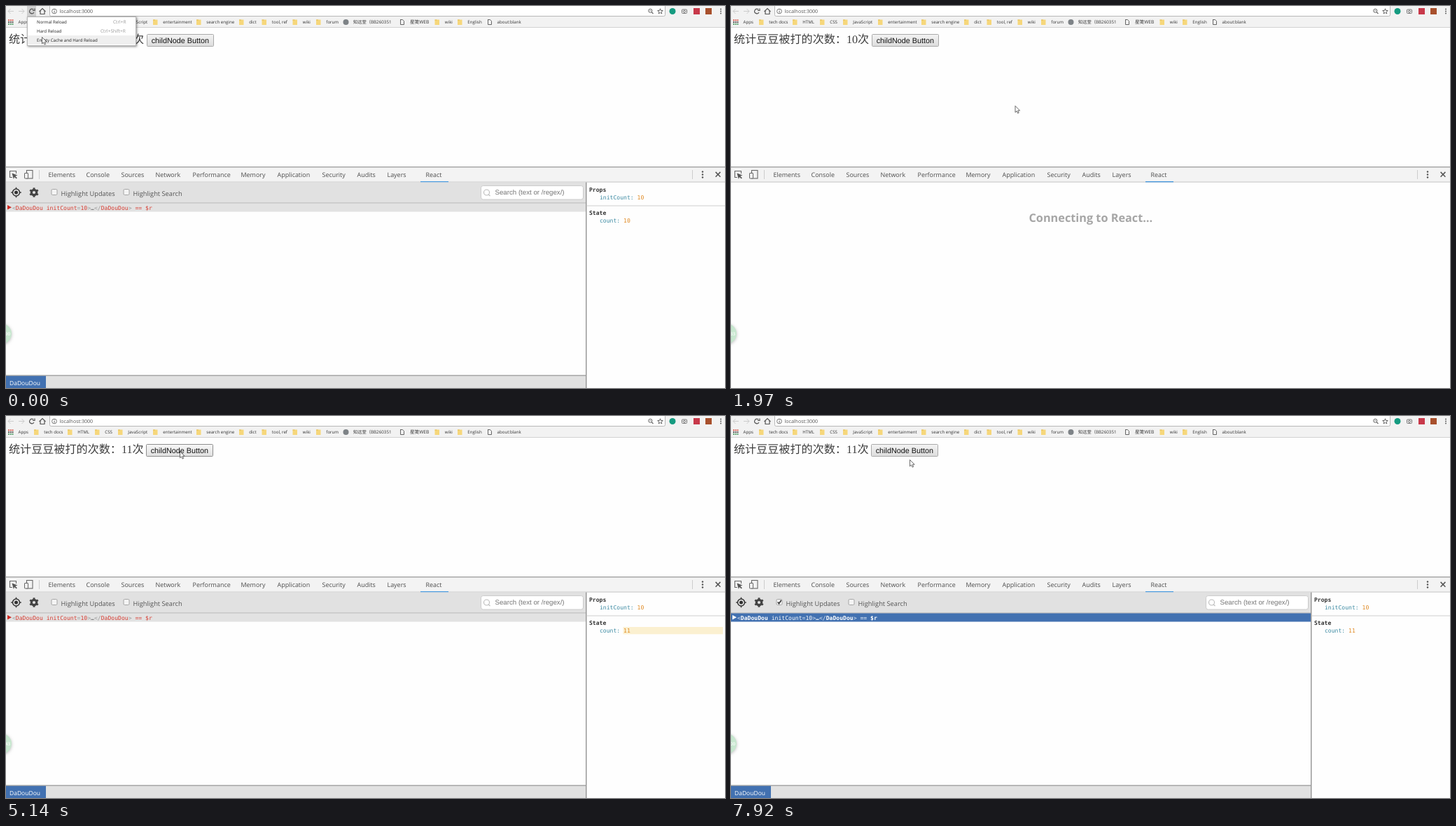
Animation of 1027x545 px, one loop 8 s. Source, as an HTML page with a canvas:

```html
<!DOCTYPE html>
<html lang="en">
<head>
<meta charset="utf-8">
<title>Counter demo</title>
<style>
html, body { margin: 0; width: 100%; height: 100%; overflow: hidden; background: #fefefe; }
canvas { display: block; }
</style>
</head>
<body>
<canvas id="stage" width="1027" height="545"></canvas>
<script>
const c = document.getElementById('stage').getContext('2d');
const LOOP = 8000;
const UI = '"Open Sans", "Noto Sans CJK SC", sans-serif';
const ARIAL = '"Liberation Sans", sans-serif';
const MONO = '"DejaVu Sans Mono", monospace';

// [time, x, y] of the pointer tip
const POINTER = [
  [0, 51, 44], [80, 51, 44], [90, 51, 47], [600, 51, 47], [790, 55, 59.5], [1100, 130, 92],
  [1500, 290, 128], [1970, 405.5, 142], [2700, 405, 142], [2970, 302, 165], [3350, 277, 102],
  [3640, 277, 102], [4000, 262, 66], [4400, 248, 50], [5640, 248, 50], [5900, 200, 130],
  [6300, 93, 265], [6500, 87, 267], [6900, 69, 264], [7180, 69, 264], [7500, 150, 190],
  [7850, 255, 75], [7920, 255, 62], [8000, 255, 62]
];
const BADGE = [[0, '90'], [500, '10'], [790, '11'], [1430, '22'], [1970, '33'], [2420, '43'],
  [3350, '40'], [3900, '43'], [5370, '41'], [6100, '42'], [7080, '00']];
const FOLDERS = [[40, 'tech docs'], [88, 'HTML'], [127, 'CSS'], [160, 'JavaScript'],
  [210, 'entertainment'], [272, 'search engine'], [333, 'dict'], [365.5, 'tool, ref'],
  [409.5, 'wiki'], [443, 'forum'], [612.5, 'wiki'], [645, 'English']];
const TABS = [[61, 'Elements'], [115, 'Console'], [165, 'Sources'], [214, 'Network'],
  [267, 'Performance'], [336, 'Memory'], [388, 'Application'], [452, 'Security'],
  [502, 'Audits'], [545, 'Layers'], [600, 'React']];

const rect = (x, y, w, h, color) => { c.fillStyle = color; c.fillRect(x, y, w, h); };

function text(s, x, y, size, color = '#333', family = UI, weight = 400) {
  c.font = `${weight} ${size}px ${family}`;
  c.fillStyle = color;
  c.fillText(s, x, y);
  return x + c.measureText(s).width;
}

function line(color, width, ...points) {
  c.strokeStyle = color;
  c.lineWidth = width;
  c.beginPath();
  points.forEach(([x, y]) => c.lineTo(x, y));
  c.stroke();
}

function disc(x, y, r, color) {
  c.fillStyle = color;
  c.beginPath();
  c.arc(x, y, r, 0, 7);
  c.fill();
}

function ring(x, y, r, color, width, from = 0, to = 2 * Math.PI) {
  c.strokeStyle = color;
  c.lineWidth = width;
  c.beginPath();
  c.arc(x, y, r, from, to);
  c.stroke();
}

function box(x, y, w, h, radius, fill, stroke) {
  c.beginPath();
  c.roundRect(x, y, w, h, radius);
  c.fillStyle = fill;
  c.fill();
  if (stroke) { c.strokeStyle = stroke; c.lineWidth = 1; c.stroke(); }
}

const cross = (x, y, r, color, width) => {
  line(color, width, [x - r, y - r], [x + r, y + r]);
  line(color, width, [x - r, y + r], [x + r, y - r]);
};
const dots = (x, y, gap, r, color) => [-gap, 0, gap].forEach(d => disc(x, y + d, r, color));
const between = (t, a, b) => t >= a && t < b;

function pointerAt(t) {
  const i = Math.max(1, POINTER.findIndex(k => k[0] > t));
  const [t0, x0, y0] = POINTER[i - 1], [t1, x1, y1] = POINTER[i];
  const p = (t - t0) / (t1 - t0);
  return [x0 + (x1 - x0) * p, y0 + (y1 - y0) * p];
}

function arrow(x, dir) {
  line('#ccc', 1, [x - 4, 7.5], [x + 4, 7.5]);
  line('#ccc', 1, [x + dir * .5, 4], [x + dir * 4, 7.5], [x + dir * .5, 11]);
}

function pageIcon(x) {
  line('#666', 1, [x, 19.5], [x + 3, 19.5], [x + 5, 21.5], [x + 5, 26.5], [x, 26.5], [x, 19]);
}

function browserBar(t) {
  rect(0, 0, 1027, 31, '#f2f2f2');
  rect(0, 30, 1027, 1, '#d2d2d2');
  arrow(7, -1);
  arrow(22, 1);
  if (t < 400) rect(30, 0, 13, 15, '#d0d0d0');
  if (between(t, 640, 1510)) cross(37, 7.5, 3, '#555', 1.2);
  else {
    ring(37, 7.5, 3.3, '#555', 1.2, .5, 5.5);
    line('#555', 1.2, [41, 3.5], [41, 6.5], [38, 6.5]);
  }
  line('#555', 1.2, [47.5, 8], [52, 3.5], [56.5, 8]);
  line('#555', 1.2, [49, 7], [49, 11.5], [55, 11.5], [55, 7]);

  box(62.5, -1.5, 879, 16, 2, '#fff', '#b8b8b8');
  ring(69, 7.5, 3.4, '#666', .9);
  rect(68.6, 7, 1, 2.6, '#666');
  rect(68.6, 5.3, 1, 1, '#666');
  text('localhost:3000', 76.5, 10, 7.05, '#555');
  ring(920.3, 6.8, 2.6, '#666', 1);
  line('#666', 1.2, [922.2, 8.8], [924.5, 11]);
  line('#666', .7, [919, 6.8], [921.6, 6.8]);
  line('#555', .9, ...Array.from({ length: 11 }, (_, i) => {
    const a = i * Math.PI / 5 - Math.PI / 2, r = i % 2 ? 1.7 : 4;
    return [934.5 + r * Math.cos(a), 7.8 + r * Math.sin(a)];
  }));

  disc(952, 7.5, 4.5, '#159b80');
  box(965.5, 5, 7, 5.5, 1, '#f2f2f2', '#777');
  ring(969, 7.8, 1.5, '#777', 1);
  rect(982, 3, 9, 9, '#c8394a');
  if (between(t, 640, 1300)) box(999.5, 3.5, 8, 8, 1, '#f2f2f2', '#d8d8d8');
  else rect(999, 3, 9, 9, '#a8502c');
  dots(1021, 7.5, 3, .9, '#555');

  for (let i = 0; i < 9; i++)
    rect(3 + i % 3 * 2.8, 19.3 + Math.floor(i / 3) * 2.8, 1.9, 1.9, ['#d9584c', '#555', '#4d9a62'][Math.floor(i / 3)]);
  text('Apps', 17.5, 25.3, 6.15);
  for (const [x, label] of FOLDERS) {
    rect(x, 19.5, 6.5, 7.5, '#f6d77b');
    rect(x, 19.5, 3, 1, '#e5bd55');
    text(label, x + 14.3, 25.3, 6.15);
  }
  disc(485.5, 23, 4, '#7d8286');
  text('知远堂（BB260351', 496, 25.3, 6.25);
  pageIcon(563.5);
  text('星笺WEB', 577, 25.3, 6.6);
  pageIcon(688.5);
  text('about:blank', 701.5, 25.3, 6.15);
}

function page(t) {
  const clicked = t >= 4450;
  const hover = between(t, 4200, 5720);
  text(`统计豆豆被打的次数：${clicked ? 11 : 10}次`, 4, 53, 16.1, '#3c3c3c',
    '"Liberation Serif", "Noto Sans CJK SC", serif', 300);
  const x = clicked ? 200.5 : 201.5;
  const shade = c.createLinearGradient(0, 40, 0, 58);
  shade.addColorStop(0, hover ? '#f8f8f8' : '#f4f4f4');
  shade.addColorStop(1, hover ? '#dfdfdf' : '#dcdcdc');
  box(x, 40.5, 95, 17, 1, shade, hover ? '#8e8e8e' : '#a9a9a9');
  text('childNode Button', x + 6.2, 52.8, 10.8, '#111', ARIAL);

  if (between(t, 640, 1200)) {
    box(-1, 217, 342, 13, [0, 3, 0, 0], '#e2e2e2');
    text('Connecting...', -.5, 226, 6, '#777');
  }
}

function menu() {
  c.save();
  c.shadowColor = 'rgba(0,0,0,.45)';
  c.shadowBlur = 3;
  c.shadowOffsetX = c.shadowOffsetY = 1;
  rect(30, 15, 156, 41.5, '#fff');
  c.restore();
  c.strokeStyle = '#b5b5b5';
  c.lineWidth = 1;
  c.strokeRect(30.5, 15.5, 155, 41);
  rect(31, 42, 154, 13, '#efefef');
  text('Normal Reload', 44, 25.3, 6.15, '#222');
  text('Hard Reload', 44, 38.2, 6.15, '#222');
  text('Empty Cache and Hard Reload', 44, 51, 6.15, '#222');
  text('Ctrl+R', 153, 25.3, 6.5, '#999');
  text('Ctrl+Shift+R', 135, 38.2, 6.5, '#999');
}

function devtoolsTabs() {
  rect(0, 229, 1027, 316, '#fefefe');
  rect(0, 229, 1027, 22, '#f3f3f3');
  rect(0, 229, 1027, 1.4, '#a2a2a2');
  rect(0, 250.6, 1027, 1, '#c4c4c4');
  line('#666', 1.1, [9, 244.5], [5.5, 244.5], [5.5, 235.5], [14.5, 235.5], [14.5, 239]);
  c.fillStyle = '#555';
  c.fill(new Path2D('M8.5 238.5l8 3-3.2 1.2 2.6 2.6-1.2 1.2-2.6-2.6-1.2 3z'));
  c.strokeStyle = '#666';
  c.lineWidth = 1.1;
  c.strokeRect(29.5, 234.5, 8.5, 11.5);
  box(26.5, 238.5, 5, 7.5, .5, '#f3f3f3', '#666');
  rect(47, 234, 1, 13, '#ccc');
  for (const [x, label] of TABS) text(label, x - .5, 244, 8.95, '#4c4c4c');
  rect(592, 250, 40, 1.4, '#4b9ce0');
  rect(980, 234, 1, 13, '#ccc');
  dots(995, 240.5, 4, 1.2, '#555');
  cross(1017, 240.3, 3.4, '#555', 1.5);
}

function checkbox(x, on) {
  box(x, 261.5, 8, 8, 1.5, '#f4f4f4', '#a5a5a5');
  if (on) line('#333', 1.6, [x + 1.8, 265.5], [x + 3.5, 267.6], [x + 6.8, 262.8]);
}

function toolbar(checked) {
  rect(0, 251.6, 828, 29, '#e1e1e1');
  ring(14.5, 266, 5, '#333', 1.5);
  disc(14.5, 266, 2.5, '#333');
  for (const [dx, dy] of [[1, 0], [-1, 0], [0, 1], [0, -1]])
    line('#333', 1.4, [14.5 + dx * 5, 266 + dy * 5], [14.5 + dx * 7.3, 266 + dy * 7.3]);
  ring(40, 266, 3.7, '#444', 3.2);
  for (let i = 0; i < 6; i++) {
    const a = i * Math.PI / 3 + Math.PI / 6;
    line('#444', 2.8, [40 + 4 * Math.cos(a), 266 + 4 * Math.sin(a)], [40 + 6.7 * Math.cos(a), 266 + 6.7 * Math.sin(a)]);
  }
  checkbox(65, checked);
  checkbox(168, false);
  text('Highlight Updates', 78.5, 270.7, 9.25, '#555');
  text('Highlight Search', 181.5, 270.7, 9.25, '#555');
  box(678.5, 256.5, 146, 19.5, 3, '#fff', '#ccc');
  ring(686.5, 266, 4, '#bbb', 1.1);
  line('#bbb', 1.2, [689.3, 269], [691.5, 271.2]);
  text('Search (text or /regex/)', 698.5, 269.2, 9.7, '#757575', ARIAL);
}

function treeRow(focused) {
  rect(0, 280.5, 828, 1.2, '#aaa');
  rect(0, 281.5, 828, 12, focused ? '#4271b1' : '#e2e2e2');
  const red = focused ? '#fff' : '#d63c31';
  const gray = focused ? '#dce6f3' : '#999';
  const strong = focused ? 700 : 400;
  c.fillStyle = focused ? '#fff' : '#d02a22';
  c.fill(new Path2D('M2 284l6 3.2-6 3.2z'));
  const parts = [['<', gray], ['DaDouDou', red, strong], [' initCount', red], ['=', gray], ['10', red],
    ['>', gray], ['…', focused ? '#fff' : '#555', strong], ['</', gray], ['DaDouDou', red, strong],
    ['>', gray], [' == ', red], ['$r', red, strong]];
  parts.reduce((x, [s, color, weight]) => text(s, x, 290.8, 8.1, color, MONO, weight), 9);
}

function sidePanel(t) {
  const field = (name, value, y) => {
    const x = text(name + ': ', 848, y, 8.1, '#3b8aa2', MONO);
    text(value, x, y, 8.1, '#e08a24', MONO);
  };
  rect(828, 251.6, 1.5, 294, '#999');
  text('Props', 833, 264.5, 8.1, '#333', MONO, 700);
  field('initCount', 10, 276.3);
  rect(830, 284.5, 197, 1, '#d0d0d0');
  text('State', 833, 297.5, 8.1, '#333', MONO, 700);
  if (between(t, 4530, 5400)) {
    const fade = Math.min(1, (5400 - t) / 780) ** 1.5;
    rect(881.5, 301, 142.5, 10.3, `rgba(236,184,18,${fade})`);
  }
  field('count', t >= 4530 ? 11 : 10, 309.3);
}

function reactPanel(t) {
  if (between(t, 1200, 2200)) {
    text('Connecting to React…', 425.5, 307.8, 16.25, '#a6a6a6', UI, 700);
    return;
  }
  toolbar(t >= 7080);
  treeRow(t >= 7080);
  rect(0, 527, 828, 18, '#e1e1e1');
  rect(0, 526.5, 828, 1.3, '#999');
  rect(0, 527.8, 57, 18, '#4271b1');
  text('DaDouDou', 5, 540.8, 8.5, '#fff');
  sidePanel(t);
}

function badge(t) {
  c.save();
  c.shadowColor = 'rgba(0,0,0,.25)';
  c.shadowBlur = 4;
  c.shadowOffsetY = 1;
  disc(-6.5, 467.5, 14.5, '#c7e7cf');
  c.restore();
  const label = BADGE.filter(k => k[0] <= t).pop()[1];
  text(label, -1, 470, 6.3, '#fff', UI, 600);
}

function pointer(t) {
  c.save();
  c.translate(...pointerAt(t));
  const shape = new Path2D('M.5.5v9.3l2.1-2 1.5 3.3 1.6-.8-1.5-3.1h2.9z');
  c.fillStyle = '#fff';
  c.fill(shape);
  c.strokeStyle = '#444';
  c.lineWidth = .8;
  c.stroke(shape);
  c.restore();
}

function draw(now) {
  const t = now % LOOP;
  c.textRendering = 'geometricPrecision';
  rect(0, 0, 1027, 545, '#fefefe');
  browserBar(t);
  page(t);
  if (t < 400) menu();
  devtoolsTabs();
  reactPanel(t);
  badge(t);
  pointer(t);
}

const start = performance.now();
function tick() {
  draw(performance.now() - start);
  requestAnimationFrame(tick);
}
tick();
</script>
</body>
</html>
```
